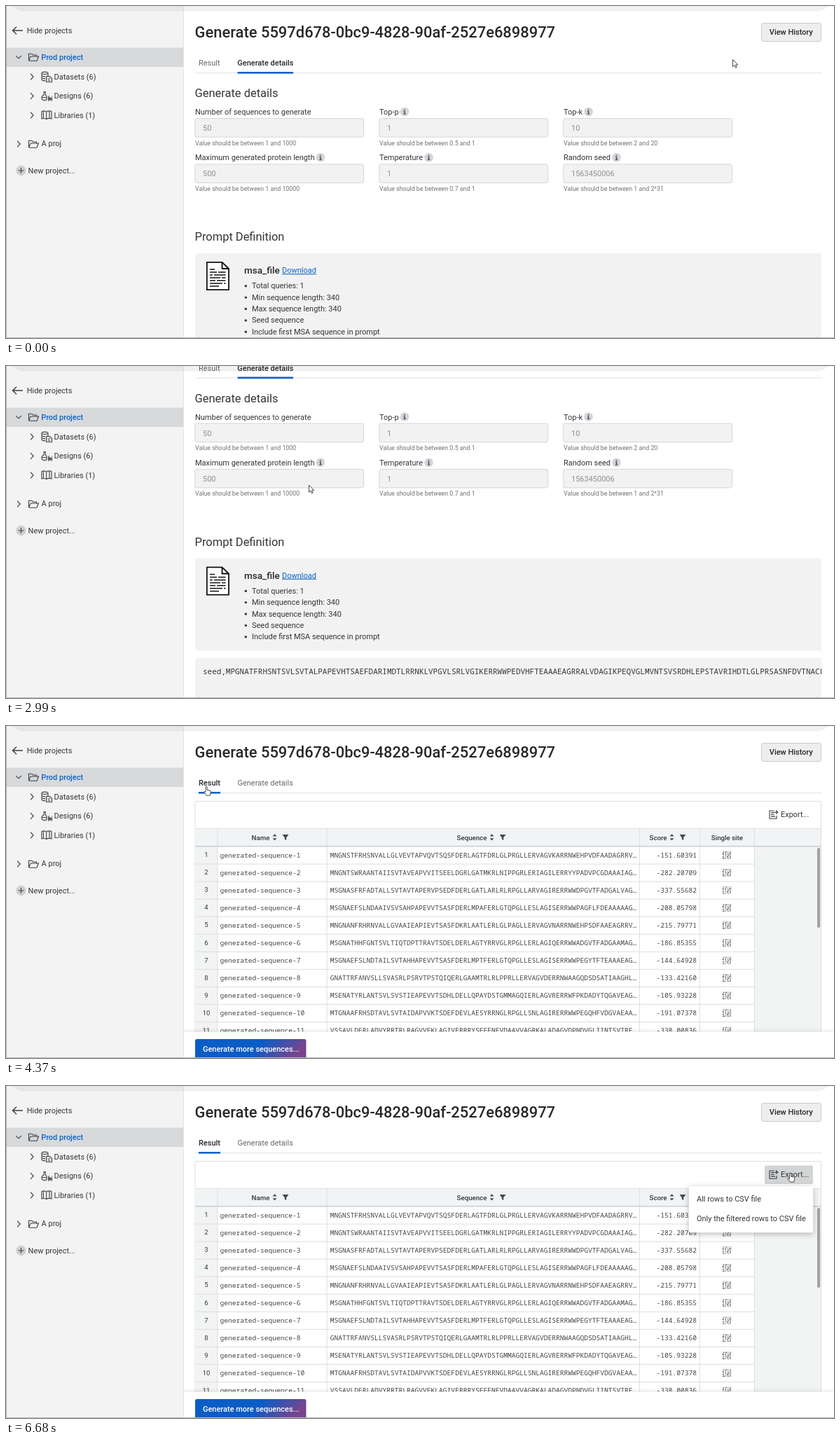
An HTML page that plays this animation: 1182 by 474 pixels, repeating every 8710 ms.

```html
<!DOCTYPE html>
<html lang="en">
<head>
<meta charset="utf-8">
<title>Generate details</title>
<style>
html, body { margin: 0; width: 100%; height: 100%; overflow: hidden; background: #fff; }
svg { display: block; }
text { font: 10.98px Roboto, sans-serif; fill: #333539; white-space: pre; }
.m { font-weight: 500; fill: #26282c; }
.title { font-size: 21.91px; font-weight: 500; fill: #25272b; }
.h { font-size: 16.45px; }
.file { font-size: 13.5px; font-weight: 500; fill: #25272b; }
.hint { font-size: 8.86px; fill: #707276; }
.val { fill: #8d8f92; }
.off { fill: #66686c; }
.blue { fill: #0b62c8; }
.link { fill: #0b62c8; text-decoration: underline; }
.white { fill: #fff; font-weight: 500; }
.th { font-size: 9.7px; font-weight: 500; fill: #333539; }
.num { font-size: 9.4px; text-anchor: middle; }
.mono { font: 9.6px "Noto Sans Mono", monospace; fill: #44464a; }
.seed { font: 10.96px "Noto Sans Mono", monospace; fill: #333539; }
.end { text-anchor: end; }
.line { fill: none; stroke: #3b3d41; stroke-width: 1.1; }
</style>
</head>
<body>
<svg id="stage" width="1182" height="474" viewBox="0 0 1182 474"></svg>
<script>
const text = (x, y, s, cls = '') => `<text x="${x}" y="${y}" class="${cls}">${s}</text>`;
const rect = (x, y, w, h, fill, more = '') =>
  `<rect x="${x}" y="${y}" width="${w}" height="${h}" fill="${fill}" ${more}/>`;
const path = (d, more = 'class="line"') => `<path d="${d}" ${more}/>`;
const put = (x, y, s) => `<g transform="translate(${x} ${y})">${s}</g>`;
const solid = 'fill="#45474b"';

// Sidebar
const chevron = (x, y, open) => put(x, y, path(open ? 'M-3.8-1.9L0 1.9L3.8-1.9' : 'M-2-4.3L2.2 0L-2 4.3'));
const folder = (x, y) => put(x, y,
  path('M-6.5 5V-4.8H-2L-.5-3H4.5V-1M-6.5 5L-3.8-1H7.5L5 5.2H-6.5'));
const icons = [
  path('M-7-5.2C-7-7.4 2-7.4 2-5.2V-1M-7-5.2V4.2C-7 5.3-4 5.8-2 5.6M-7-5.2C-7-3.2 2-3.2 2-5.2M-7-2C-7-.4-3.5-.2-2-.5M-7 1.2C-7 2.6-4 2.8-2 2.6M-.5-.5H4.5L7.5 2.5V7.5H-.5ZM1.5 3H5M1.5 5.2H5'),
  path('M-4.5-6H-1M-3.8-6V-1.5C-8-.5-8.5 6-3 6.3C1.5 6 1 0-1.7-1.5V-6M-6.5 2H.5') +
  path('M2 7V1L3.5-1V3L5 1L6.5 4L8-1V7H6.5V4L5 7L3.5 4V7Z', solid),
  path('M-7-5.5C-5-6.5-2-6-.3-5C1.5-6 5-6.5 7-5.5V5C5 4.3 1.5 4.5-.3 5.6C-2 4.5-5 4.3-7 5ZM-.3-5V5.6M-4.5-6V4.5M4-6V4.5')
];
const branch = (y, s, icon) => chevron(37, y, 0) + put(58, y, icon) + text(68.6, y + 3.5, s);

const sidebar = rect(0, 0, 253, 474, '#f3f3f3') + rect(0, 59.5, 253, 27.5, '#d8d9da') +
  rect(253, 0, 1, 474, '#e2e3e4') +
  path('M24 35H9.5M15 29.8L9.5 35L15 40.2', 'class="line" style="stroke-width:1.4"') +
  text(29.7, 38.8, 'Hide projects') +
  chevron(18, 73, 1) + folder(39, 73) + text(50.2, 76.7, 'Prod project', 'm blue') +
  ['Datasets (6)', 'Designs (6)', 'Libraries (1)'].map((s, i) => branch(101 + 27.5 * i, s, icons[i])).join('') +
  chevron(18, 197, 0) + folder(39, 197) + text(50.6, 200.4, 'A proj') +
  '<circle cx="21.5" cy="235" r="7.2" fill="#cdcfd1"/>' + path('M21.5 231V239M17.5 235H25.5') +
  text(31.6, 238.6, 'New project...');

// Details tab
const info = (x, y) => `<circle cx="${x}" cy="${y}" r="6.3" fill="#d2d5d9"/>` +
  rect(x - .8, y - 3.5, 1.6, 1.6, '#4b4e53') +
  path(`M${x - 1.5} ${y - 1}H${x + .8}V${y + 2.6}H${x + 1.8}V${y + 3.6}H${x - 1.8}V${y + 2.6}H${x - .7}V${y}H${x - 1.5}Z`, solid);
const field = (x, y, name, val, range, tip) => text(x, y + 4, name) + (tip ? info(tip, y) : '') +
  rect(x - .2, y + 9.6, 240.8, 26.5, '#f2f2f2', 'stroke="#d4d6d8" rx="2.5"') +
  text(x + 11, y + 27, val, 'val') + text(x, y + 47.6, 'Value should be between ' + range, 'hint');
const bullet = (s, i) => `<circle cx="342.3" cy="${399.7 + 16.4 * i}" r="1.7" fill="#333539"/>` +
  text(351, 403.2 + 16.4 * i, s);
const doc = path('M286.8 365.8H308.5L318 375V405.2H286.8ZM308.5 365.8V375H318',
  'fill="#fff" stroke="#111" stroke-width="1.8" stroke-linejoin="round"') +
  path('M291 376H298M291 380H301M303 380H313.5M291 384H295M297 384H313.5M291 388H306M308 388H313.5M291 392H299M301 392H313.5M291 396H309M311 396H313.5M291 400H304',
    'stroke="#111" stroke-width="1.7"');
const seed = 'seed,MPGNATFRHSNTSVLSVTALPAPEVHTSAEFDARIMDTLRRNKLVPGVLSRLVGIKERRWWPEDVHFTEAAAEAGRRALVDAGIKPEQVGLMVNTSVSRDHLEPSTAVRIHDTLGLPRSASNFDVTNACL';

const details = text(275, 85.4, 'Result', 'off') + text(330.3, 85.4, 'Generate details', 'm') +
  rect(330.5, 94, 79.5, 2.6, '#0b62c8') +
  text(269.6, 130.4, 'Generate details', 'h') +
  field(270, 151, 'Number of sequences to generate', '50', '1 and 1000') +
  field(533, 151, 'Top-p', '1', '0.5 and 1', 569) +
  field(796, 151, 'Top-k', '10', '2 and 20', 831.5) +
  field(270, 216.3, 'Maximum generated protein length', '500', '1 and 10000', 449) +
  field(533, 216.3, 'Temperature', '1', '0.7 and 1', 603.5) +
  field(796, 216.3, 'Random seed', '1563450006', '1 and 2^31', 871.5) +
  text(269.6, 335, 'Prompt Definition', 'h') +
  rect(270, 353.3, 894, 131.5, '#f2f2f2', 'rx="2.5"') + doc +
  text(340, 382.2, 'msa_file', 'file') + text(394, 381.2, 'Download', 'link') +
  ['Total queries: 1', 'Min sequence length: 340', 'Max sequence length: 340', 'Seed sequence',
    'Include first MSA sequence in prompt'].map(bullet).join('') +
  rect(270, 495.5, 894, 120, '#f2f2f2', 'rx="2.5"') +
  `<svg x="270" y="495" width="894" height="60">${text(11, 23.2, seed, 'seed')}</svg>`;

// Result tab
const rows = `MNGNSTFRHSNVALLGLVEVTAPVQVTSQSFDERLAGTFDRLGLPRGLLERVAGVKARRNWEHPVDFAADAGRRV -151.60391
MNGNTSWRAANTAIISVTAVEAPVVITSEELDGRLGATMKRLNIPPGRLERIAGILERRYYPADVPCGDAAAIAG -282.20709
MSGNASFRFADTALLSVTAVTAPERVPSEDFDERLGATLARLRLRPGLLARVAGIRERRWWDPGVTFADGALVAG -337.55682
MSGNAEFSLNDAAIVSVSAHPAPEVVTSASFDERLMPAFERLGTQPGLLESLAGISERRWWPAGFLFDEAAAAAG -208.05798
MNGNANFRHRNVALLGVAAIEAPIEVTSASFDKRLAATLERLGLPAGLLERVAGVNARRNWEHPSDFAAEAGRRV -215.79771
MSGNATHHFGNTSVLTIQTDPTTRAVTSDELDERLAGTYRRVGLRPGLLERLAGIQERRWWADGVTFADGAAMAG -186.85355
MSGNAEFSLNDTAILSVTAHHAPEVVTSASFDERLMPTFERLGTQPGLLESLAGISERRWWPEGYTFTEAAAEAG -144.64928
GNATTRFANVSLLSVASRLPSRVTPSTQIQERLGAAMTRLRLPPRLLERVAGVDERRNWAAGQDSDSATIAAGHL -133.42160
MSENATYRLANTSVLSVSTIEAPEVVTSDHLDELLQPAYDSTGMMAGQIERLAGVRERRWFPKDADYTQGAVEAG -105.93228
MTGNAAFRHSDTAVLSVTAIDAPVVKTSDEFDEVLAESYRRNGLRPGLLSNLAGIRERRWWPEGQHFVDGVAEAA -191.07378
VSSAVLDERLADVYRRTRLRAGVVEKLAGIVERRRYSEEENEVDAAVVAGRKALADAGVDPNDVGLIINTSVTRE -338.00836`
  .split('\n').map(r => r.split(' '));
const rowH = 25.06;
const dots = path('M-5.5-4.5H5.5V-2.2H-5.5V0H5.5V2.2H-5.5V4.5H5.5',
  'fill="none" stroke="#4a4c50" stroke-width="1.2" stroke-dasharray="1.7 1.5 2.6 1.2 1 1.9"');
const row = ([seq, score], i) => {
  const y = 172 + rowH * i, b = y + 15.7;
  return rect(270, y + rowH - .5, 798.5, 1, '#dcdee0') + text(286, y + 15.2, i + 1, 'num') +
    text(305.4, b, 'generated-sequence-' + (i + 1), 'mono') + text(462.7, b, seq + '…', 'mono') +
    text(986, b, score, 'mono end') + put(1029, y + 12.4, dots);
};
const head = (x, s, icon) => text(x, 162.5, s, 'th') + (icon ? put(icon, 158.8,
  path('M-3-1.4L0-4.6L3-1.4ZM-3 1.4L0 4.6L3 1.4ZM11-3.7H20L16.7.4V4.2L14.3 3V.4Z', solid)) : '');
const exportIcon = put(1095.5, 126.5,
  path('M1-5.5H-5.5V5.8H4.5V1.5M-3.5-2.6H0M-3.5 0H1M-3.5 2.6H2.5M-.5-2.5Q2-3.8 5.5-3.5M3.5-6L6.3-3.5L3.5-1'));

const result = text(275, 85.4, 'Result', 'm') + text(330.5, 85.4, 'Generate details', 'off') +
  rect(275, 94, 31, 2.6, '#0b62c8') +
  rect(270, 107.5, 893.5, 400, '#fff', 'stroke="#dcdee0" rx="2"') +
  rect(1083, 113.5, 69, 26.5, '#d3d4d5', 'rx="2.5" id="hover"') + exportIcon + text(1106, 130.4, 'Export...') +
  rect(270.5, 146, 892.5, 25.5, '#f2f3f4') + rect(270.5, 146, 892.5, 1, '#dcdee0') +
  rect(270.5, 172, 31.5, 270, '#f2f3f4') + rect(1068.5, 172, 94.5, 270, '#f2f3f3') +
  rows.map(row).join('') +
  [301.5, 457.5, 904, 989.8, 1068].map(x => rect(x, 146, 1, 292, '#dcdee0')).join('') +
  rect(270.5, 171, 892.5, 1.6, '#c9d1da') +
  head(350.6, 'Name', 383.5) + head(643.6, 'Sequence', 693.5) + head(918.6, 'Score', 950.5) + head(1006.8, 'Single site') +
  rect(1158, 174, 4.2, 114, '#a2a3a4', 'rx="2"') +
  rect(254, 436.5, 928, 40, '#fff', 'style="filter:drop-shadow(0 -1px 2px #0002)"') +
  rect(270, 447, 158.5, 32, 'url(#grad)', 'rx="2.5"') + text(281, 464.8, 'Generate more sequences...', 'white');

const menu = rect(974.8, 143, 177.4, 66.3, '#fff', 'rx="2.5" style="filter:drop-shadow(0 2px 4px #0004)"') +
  text(986, 165.2, 'All rows to CSV file') + text(986, 193.4, 'Only the filtered rows to CSV file');
const pointer = 'fill="#fff" stroke="#333" stroke-width=".9" stroke-linejoin="round"';

stage.innerHTML = `<defs><linearGradient id="grad" x1="0" y1="0" x2="1" y2=".2">
  <stop offset=".6" stop-color="#0a5dc5"/><stop offset="1" stop-color="#77458f"/></linearGradient></defs>
  ${rect(0, 0, 1182, 474, '#fff')}
  <g id="page">${text(269.6, 45.3, 'Generate 5597d678-0bc9-4828-90af-2527e6898977', 'title')}
    ${rect(1078.5, 24.5, 85, 26, '#eeeeef', 'stroke="#c9cbcd" rx="2.5"')}${text(1089.8, 41.4, 'View History', 'm')}
    ${rect(270, 95, 894, 1, '#dfe1e3')}
    ${rect(270, 71, 41, 21.5, '#d8d9da', 'rx="2" id="press"')}
    <g id="details">${details}</g><g id="result">${result}</g></g>
  ${sidebar}
  ${rect(1, -40, 1181, 47.5, '#000', 'rx="26" opacity=".055"')}
  ${rect(0, 0, 1, 474, '#a9abad')}${rect(0, 473, 1182, 1, '#b5b7b9')}
  <g id="menu">${menu}</g>
  <g id="cursor">${path('M0 0V10.3L2.4 8.1L4 11.8L5.7 11L4.1 7.4H7.2Z', pointer + ' id="arrow"')}
    ${path('M3 1.2a1.1 1.1 0 0 1 2.2 0V5L9 5.8Q10.4 6.2 10.2 7.8L9.3 12.8H4.2L.6 8.5Q.2 7.1 1.6 7.2L3 8.3Z', pointer + ' id="hand"')}</g>`;

// Steps: time, then the values held until the next step
const moves = [[0, 1037.5, 76.5], [680, 1041, 75], [1330, 981, 101.5], [1490, 820, 150], [1610, 656, 183],
  [1880, 596, 183], [2030, 506, 199], [2180, 499, 200.5], [2600, 492, 200], [2720, 488, 199], [2870, 460, 186],
  [2990, 432.5, 170], [3140, 406, 152], [3260, 388.7, 141.5], [3530, 345, 112], [3650, 306, 89], [3800, 283.5, 93],
  [3950, 281, 90], [4100, 282, 86.3], [4520, 420, 150], [4650, 641, 220], [4800, 1051, 199], [4950, 1121, 174],
  [5110, 1128.5, 171], [5380, 1125, 156], [5500, 1121.5, 142], [5650, 1118, 130], [5770, 1115.5, 124.3]];
const scrolls = [[0, 0], [2330, 7], [2450, 59.5], [2600, 77], [2720, 78.5], [3410, 17], [3530, 2], [3650, 0]];
const fades = [[0, 0], [6290, .35], [6410, .85], [6530, 1]];
const at = (steps, t) => steps.filter(s => s[0] <= t).pop();
const $ = id => document.getElementById(id);
const show = (id, on) => $(id).setAttribute('visibility', on ? 'inherit' : 'hidden');

function draw(now) {
  const t = now % 8710, [, x, y] = at(moves, t);
  const done = t >= 4370, over = t >= 3950 && t < 4520 || t >= 5650;
  show('details', !done);
  show('result', done);
  show('press', t >= 4250 && !done);
  show('hover', done && t >= 5650);
  show('arrow', !over);
  show('hand', over);
  $('page').setAttribute('transform', `translate(0 ${-at(scrolls, t)[1]})`);
  $('menu').setAttribute('opacity', at(fades, t)[1]);
  $('cursor').setAttribute('transform', `translate(${x} ${y})`);
  requestAnimationFrame(draw);
}
draw(performance.now());
</script>
</body>
</html>
```
